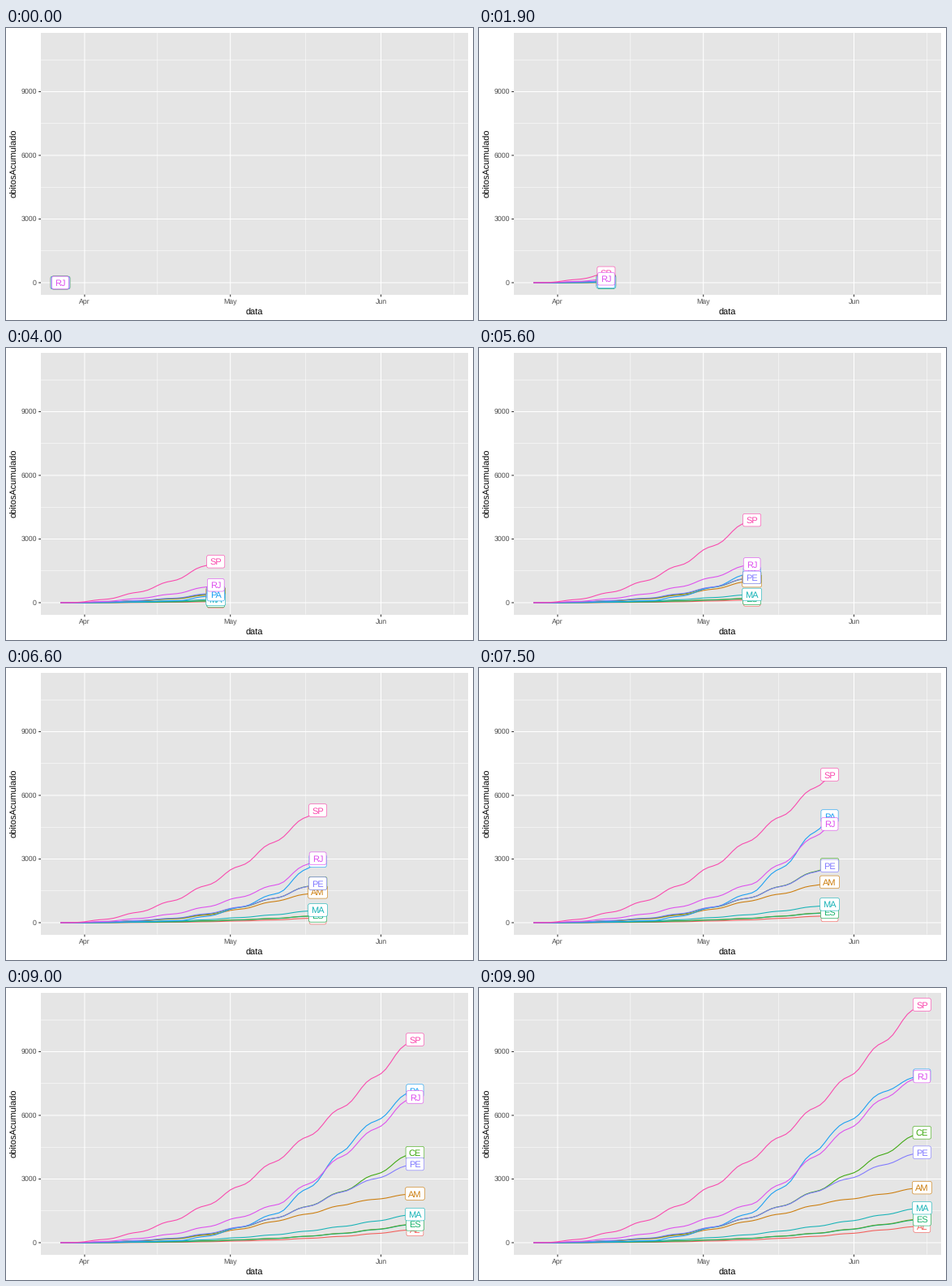
A matplotlib script that plays this animation: 576 px wide and 360 px high, repeating every 10 s.

```python
import numpy as np
import matplotlib.pyplot as plt
from matplotlib.animation import FuncAnimation
from matplotlib.patches import FancyBboxPatch, Rectangle

plt.rcParams.update({"font.family": ["Liberation Sans"], "text.hinting": "none"})

W, H = 576, 360
FRAMES, DAYS = 100, 80
LEFT, RIGHT, TOP, BOTTOM = 43.0, 570.4, 5.5, 328.6
LABEL_H = 15.6

# Colour and cumulative deaths on the key days.
KEY_DAYS = [0, 25, 45, 60, 72, 80]
STATES = {
    "AL": ("#F35E5A", [23, 140, 330, 605, 795]),
    "AM": ("#CC7D0D", [210, 1060, 1888, 2293, 2615]),
    "BA": ("#949510", [58, 215, 490, 865, 1140]),
    "CE": ("#3DA80F", [225, 1225, 2640, 4175, 5260]),
    "ES": ("#1AB36B", [45, 210, 480, 850, 1115]),
    "MA": ("#17B3B7", [85, 395, 835, 1315, 1660]),
    "PA": ("#189FF3", [110, 1460, 4880, 7118, 7940]),
    "PE": ("#8079FF", [250, 1225, 2614, 3670, 4297]),
    "RJ": ("#DD4EEE", [485, 1864, 4502, 6800, 7908]),
    "SP": ("#FA47AD", [1220, 3987, 6805, 9464, 11345]),
}


def px(day):
    return 67.0 + 5.992 * day


def py(value):
    return 314.0 - 78.5 / 3000 * value


def daily(keys):
    """Near-quadratic growth with a weekly rhythm: reports lag at weekends."""
    day = np.arange(DAYS + 1)
    reported = day + 0.6 * np.sin(2 * np.pi * (day - 5.3) / 7)
    return np.interp(reported, KEY_DAYS, np.sqrt([0, *keys])) ** 2


fig = plt.figure(figsize=(W / 72, H / 72), dpi=72, facecolor="white")
ax = fig.add_axes([0, 0, 1, 1])
ax.set(xlim=(0, W), ylim=(H, 0))
ax.axis("off")


def segment(x, y, color, width, z):
    ax.plot(x, y, color=color, lw=width, zorder=z, solid_capstyle="butt", snap=False)


def draw_axes():
    ax.add_patch(Rectangle((LEFT, TOP), RIGHT - LEFT, BOTTOM - TOP,
                           fc="#E5E5E5", lw=0, zorder=0))
    for day in (20, 50.5, 81):
        segment([px(day)] * 2, [TOP, BOTTOM], "white", 0.53, 1)
    for value in range(1500, 11000, 3000):
        segment([LEFT, RIGHT], [py(value)] * 2, "white", 0.53, 1)
    for name, day in {"Apr": 5, "May": 35, "Jun": 66}.items():
        x = px(day)
        segment([x, x], [TOP, BOTTOM], "white", 1.07, 2)
        segment([x, x], [BOTTOM, BOTTOM + 2.75], "#333333", 1.07, 2)
        ax.text(x, 340, name, size=8.8, color="#4D4D4D", ha="center")
    for value in range(0, 9001, 3000):
        y = py(value)
        segment([LEFT, RIGHT], [y, y], "white", 1.07, 2)
        segment([LEFT - 2.75, LEFT], [y, y], "#333333", 1.07, 2)
        ax.text(38, y + 2.9, str(value), size=8.8, color="#4D4D4D", ha="right")
    ax.text((LEFT + RIGHT) / 2, 353.8, "data", size=11, ha="center")
    ax.text(13.8, (TOP + BOTTOM) / 2, "obitosAcumulado", size=11, rotation=90,
            rotation_mode="anchor", ha="center", va="baseline")


class Series:
    def __init__(self, name, color, keys):
        self.x = px(np.arange(DAYS + 1))
        self.y = py(daily(keys))
        self.line, = ax.plot([], [], color=color, lw=1.07, zorder=3,
                             solid_capstyle="butt", solid_joinstyle="round")
        self.text = ax.text(0, 0, name, size=11, color=color, ha="center")
        extent = self.text.get_window_extent(fig.canvas.get_renderer())
        self.width = extent.width + 7.4
        self.box = FancyBboxPatch((0, 0), self.width, LABEL_H, fc="white", ec=color, lw=0.6,
                                  boxstyle="round,pad=0,rounding_size=2.2")
        ax.add_patch(self.box)

    def show(self, day, rank):
        x, y = self.x[day], self.y[day]
        self.line.set_data(self.x[:day + 1], self.y[:day + 1])
        self.text.set_position((x, y + 4))
        self.box.set_bounds(x - self.width / 2, y - LABEL_H / 2, self.width, LABEL_H)
        self.box.set_zorder(20 + rank)
        self.text.set_zorder(20.5 + rank)


draw_axes()
series = {name: Series(name, *spec) for name, spec in STATES.items()}


def label_order(day):
    pair = ["PE", "PA"] if day < 40 else ["PA", "PE"]
    return ["SP", "AL", "AM", "BA", "CE", "ES", "MA", *pair, "RJ"]


def update(i):
    day = round(i * DAYS / (FRAMES - 1))
    for rank, name in enumerate(label_order(day)):
        series[name].show(day, rank)
    return []


anim = FuncAnimation(fig, update, frames=FRAMES, interval=100,
                     repeat=True, repeat_delay=0, blit=False)
plt.show()
```
